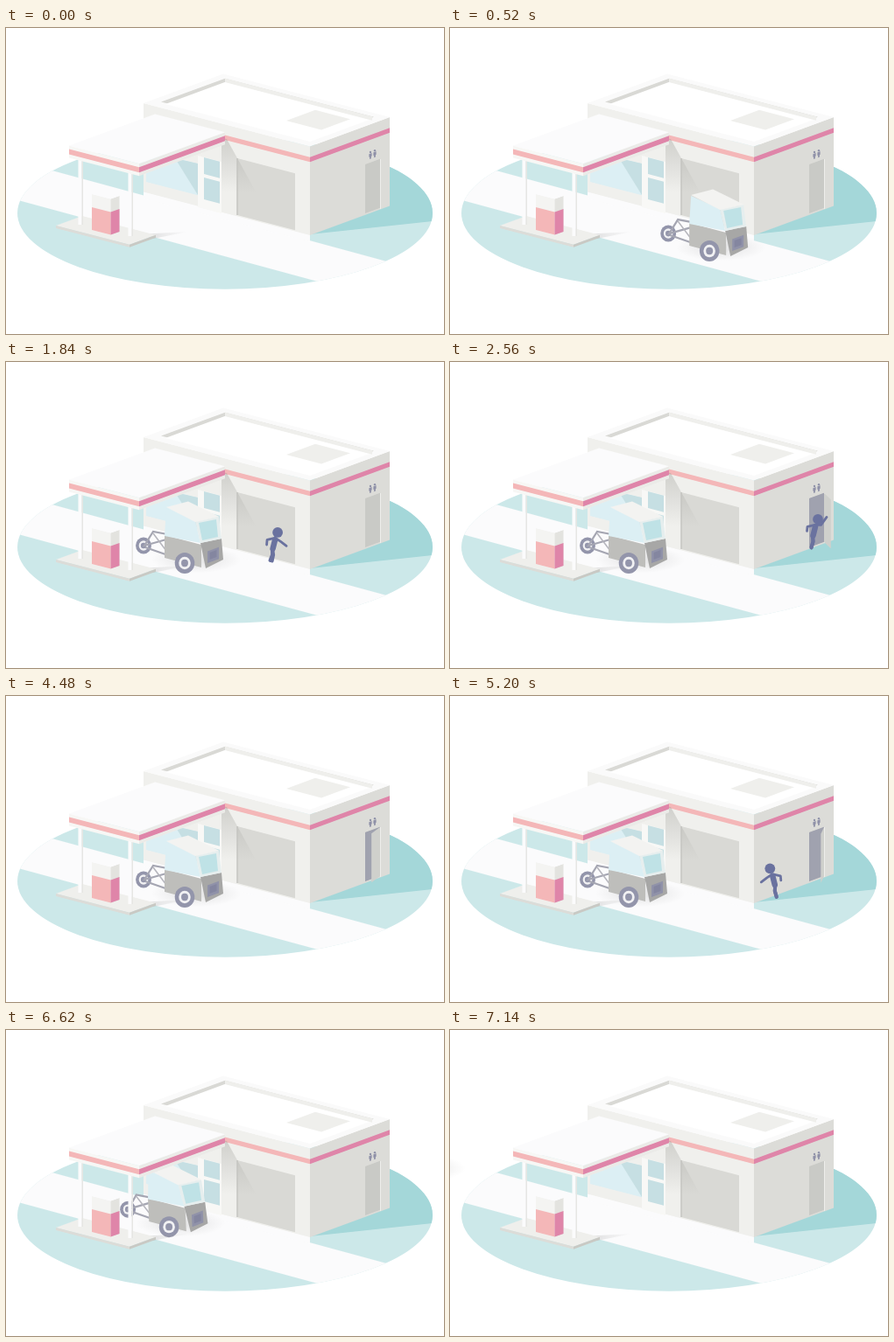
Write an HTML page with a canvas that moves like this. It is 500 by 350 pixels and loops after 8680 ms.

```html
<!DOCTYPE html>
<html>
<head>
<meta charset="utf-8">
<title>Fuel stop</title>
<style>
html, body { margin: 0; width: 100%; height: 100%; overflow: hidden; background: #fff; }
canvas { display: block; width: 500px; height: 350px; }
</style>
</head>
<body>
<canvas id="stage" width="500" height="350"></canvas>
<script>
const ctx = document.getElementById('stage').getContext('2d');
const LOOP = 8680, STEP = 40, LEAVE = 6620, GONE = 7140;

// Slopes of the two ground axes and of the road
const FRONT = 0.26, SIDE = -0.368, ROAD = 0.272;

const C = {
  salmon: '#f4b7b8', rose: '#df85a9', white: '#fbfbfc', pale: '#efefec',
  wall: '#dcdcd8', panel: '#d9d9d5', teal: '#a4d7d9', aqua: '#cce8e9',
  glass: '#dceff4', pane: '#c6dfe3', person: '#6a729f', tyre: '#9395ab'
};

function trace(p) {
  ctx.beginPath();
  for (let i = 0; i < p.length; i += 2) ctx.lineTo(p[i], p[i + 1]);
}

function poly(fill, ...p) {
  trace(p);
  ctx.fillStyle = fill;
  ctx.fill();
}

function line(color, width, ...p) {
  trace(p);
  ctx.strokeStyle = color;
  ctx.lineWidth = width;
  ctx.stroke();
}

function oval(fill, x, y, rx, ry = rx) {
  ctx.beginPath();
  ctx.ellipse(x, y, rx, ry, 0, 0, Math.PI * 2);
  ctx.fillStyle = fill;
  ctx.fill();
}

function fade(x0, y0, x1, y1, from, to) {
  const g = ctx.createLinearGradient(x0, y0, x1, y1);
  g.addColorStop(0, from);
  g.addColorStop(1, to);
  return g;
}

// Upright panel whose top edge starts at x, y and follows a slope
function upright(fill, slope, x, y, w, h) {
  const end = y + w * slope;
  poly(fill, x, y, x + w, end, x + w, end + h, x, y + h);
}
const front = (fill, ...at) => upright(fill, FRONT, ...at);
const side = (fill, ...at) => upright(fill, SIDE, ...at);

// Level surface from its left corner: a along the front, b along the side
function level(fill, x, y, a, b) {
  poly(fill, x, y, x + a, y + a * FRONT,
    x + a + b, y + a * FRONT + b * SIDE, x + b, y + b * SIDE);
}

// Paint a front face and the side face that joins it
function wrap(frontFill, sideFill, x, y, a, b, h) {
  front(frontFill, x, y, a, h);
  side(sideFill, x + a, y + a * FRONT, b, h);
}

const clamp = v => Math.max(0, Math.min(1, v));
const ramp = (t, from, to) => clamp((t - from) / (to - from));
const smooth = v => v * v * (3 - 2 * v);

function ground() {
  ctx.save();
  ctx.beginPath();
  ctx.ellipse(250, 211.7, 237, 87, 0, 0, Math.PI * 2);
  ctx.clip();
  ctx.fillStyle = C.aqua;
  ctx.fillRect(0, 100, 500, 220);
  poly(C.teal, 347, 100, 500, 100, 500, 219.5, 347, 236);
  upright(C.white, ROAD, 0, 148.7, 500, 44.5);
  front(C.white, 157, 183, 190, 12);
  ctx.restore();
}

function building() {
  const x = 157, y = 86, a = 190, b = 91;
  wrap('#f0f0ed', C.wall, x, y, a, b, 101.5);
  wrap(C.salmon, C.rose, 250, 122.6, 97, b, 5.5);

  // roof with a sunken floor
  level('#fafafa', x, y, a, b);
  level(C.panel, 177, 84.5, 170, 73);
  level('#fff', 182, 87, 165, 69);
  upright(C.pale, FRONT, 250, 57.5, 168, 4.5);
  level('#efefec', 320, 106, 40, 33);

  // shop front
  front(C.glass, 160, 140, 59, 36);
  poly(C.pane, 193, 149, 219, 155, 219, 191);
  front('#f8f8f6', 219, 146, 27, 59);
  for (const [top, h] of [[148, 19], [171, 25]]) front(C.pane, 226, top, 18, h);

  // garage and the canopy's shadow
  front(C.panel, 264, 149, 66, 65);
  poly(fade(0, 130, 0, 188, 'rgba(140,140,135,.3)', 'rgba(140,140,135,0)'),
    246, 126, 252, 127, 285, 187, 264, 210, 246, 205);
  line('#c5c5c1', 1.5, 264, 149, 264, 214);

  // side door and sign
  side('#c9cac6', 410, 156, 17, 56);
  line('#eeeeeb', 1, 427.5, 150, 427.5, 207);
  for (const px of [416, 421]) {
    const py = 142 + (px - 416) * SIDE;
    oval('#8f91a8', px, py, 1.2);
    side('#8f91a8', px - 1.6, py + 2.2, 3.2, 3.6);
    side('#8f91a8', px - 0.9, py + 4, 1.8, 4);
  }
}

function sideDoor(t) {
  const going = Math.min(ramp(t, 2300, 2680), ramp(t, 3280, 2900));
  const leaving = Math.min(ramp(t, 4440, 4620), ramp(t, 5440, 4820));
  const swing = Math.max(going, leaving);
  if (!swing) return;
  const angle = swing * Math.PI / 2;
  const x = 427 - 17 * Math.cos(angle) + 18 * Math.sin(angle);
  const y = 150 + 6 * Math.cos(angle) + 5 * Math.sin(angle);
  side('#a0a2af', 410, 156, 17, 56);
  upright('#cfd0cc', (y - 150) / (x - 427), 427, 150, x - 427, 56);
}

function person(x, y, dir, phase) {
  const k = Math.sin(phase), stride = Math.cos(phase);
  ctx.save();
  ctx.translate(x, y);
  ctx.scale(dir, 1);
  ctx.lineCap = ctx.lineJoin = 'round';
  for (const s of [stride, -stride]) {
    line(C.person, 4, 1.5, -16, 2 + s * 3, -9, s * 6, -2 - Math.max(0, -s) * 3);
  }
  line(C.person, 6.5, 4.5, -26, 2, -16);
  line(C.person, 2.8, 5, -28, 11, -26 + k * 2, 17.5, -28 + k * 9);
  line(C.person, 2.8, 4, -28, -4.5, -26, -5, -21 + stride * 3);
  oval(C.person, 7.5, -34.5, 5.9);
  ctx.restore();
}

// Vehicle, corner of the building, doorstep, inside
const route = [[232, 213], [352, 241], [418, 212], [402, 204]];
const wayBack = [...route].reverse();

function walk(t, path, times, dir, phase) {
  if (t < times[0] || t >= times[3]) return;
  const i = times.findIndex(end => t < end) - 1;
  const u = ramp(t, times[i], times[i + 1]);
  const [x, y] = path[i].map((v, k) => v + (path[i + 1][k] - v) * u);
  ctx.save();
  if (path[i] === route[3] || path[i + 1] === route[3]) {
    trace([410, 156, 427, 150, 427, 206, 410, 212]);
    ctx.clip();
  }
  person(x, y, dir, phase);
  ctx.restore();
}

function walker(t) {
  walk(t, route, [1440, 2120, 2600, 2820], 1, (t - 2560) / 75 - Math.PI / 2);
  walk(t, wayBack, [4480, 4700, 5430, 6120], -1, (t - 5200) / 75 + Math.PI / 2);
}

function wheel(x, y, r) {
  for (const [fill, size] of [[C.tyre, 1], ['#f1f1f3', 0.6], [C.tyre, 0.35]]) {
    oval(fill, x, y, r * 0.94 * size, r * size);
  }
}

function vehicle(dx, lean) {
  ctx.save();
  ctx.translate(dx, dx * ROAD);

  // soft ground shadow
  ctx.save();
  ctx.translate(217, 226);
  ctx.scale(1, 0.3);
  const g = ctx.createRadialGradient(0, 0, 12, 0, 0, 51);
  g.addColorStop(0, 'rgba(120,120,120,.15)');
  g.addColorStop(1, 'rgba(120,120,120,0)');
  oval(g, 0, 0, 51);
  ctx.restore();

  wheel(157, 210, 9.5);
  ctx.save();
  ctx.transform(1, 0, lean * 0.05, 1 + lean * 0.02, -lean * 11, -lean * 4.5);

  // front frame
  line('#a5a6b2', 2.2, 184, 197, 168, 194, 158, 210, 183, 203);
  line('#a5a6b2', 2.2, 159, 212, 182, 220);
  line('#b5b5bc', 1.5, 168, 196, 183, 216);

  // body
  front('#bebebb', 181, 198, 42, 26);
  poly('#a7a7a6', 222, 207, 246, 202, 248, 226, 228, 236);
  side('#9092a9', 230, 216.5, 13, 13.5);
  side('#8486a0', 232.5, 218, 8, 8);

  // cabin
  poly(C.glass, 183, 167, 216, 182, 222, 207, 181, 199);
  poly('#e6eeee', 216, 182, 243, 177, 246, 202, 222, 207);
  poly('#bfe2e6', 220, 184, 240, 180, 242, 200, 224, 204);
  poly('#f3f3f1', 183, 166, 208, 159.5, 243.5, 177, 216, 183);
  ctx.restore();

  wheel(204, 230, 12);
  ctx.restore();
}

function drive(t) {
  if (t < 1100) {
    vehicle(380 * (1 - ramp(t, 0, 1080)) ** 2 - 10, smooth(ramp(t, 760, 1060)));
  } else if (t < LEAVE) {
    const lean = 1 - smooth(ramp(t, 1100, 1240));
    vehicle(-10 * lean, lean);
  } else {
    vehicle(-250 * ((t - 6430) / 710) ** 2, 1);
  }
}

function pillar(x, top, bottom) {
  ctx.fillStyle = C.white;
  ctx.fillRect(x, top, 4, bottom - top);
  ctx.fillStyle = '#e6e6e3';
  ctx.fillRect(x + 4, top, 1.5, bottom - top);
}

function forecourt() {
  // island
  poly(fade(165, 0, 208, 0, 'rgba(150,150,150,.25)', 'rgba(150,150,150,0)'),
    150, 236, 208, 233, 168, 241);
  level(C.pale, 57, 226, 84, 30);
  wrap(C.wall, '#c9c9c4', 57, 226, 84, 30, 3);

  // pump
  wrap('#f4f4f2', '#e3e3df', 98, 190, 21.5, 10, 41);
  wrap(C.salmon, C.rose, 98, 205, 21.5, 10, 26);
  level(C.white, 98, 190, 21.5, 10);

  pillar(82.5, 150, 225);
  pillar(139.5, 163, 238);

  // canopy
  wrap('#f7f7f5', '#ebebe8', 72, 134.5, 80, 98, 14);
  wrap(C.salmon, C.rose, 72, 138.5, 80, 98, 6);
  level(C.white, 72, 134.5, 80, 98);
}

function draw(now) {
  const raw = now % LOOP;
  const base = raw < LEAVE ? 0 : LEAVE;
  const t = Math.min(GONE, base + Math.floor((raw - base) / STEP) * STEP);
  ctx.fillStyle = '#fff';
  ctx.fillRect(0, 0, 500, 350);
  ground();
  building();
  sideDoor(t);
  walker(t);
  drive(t);
  forecourt();
}

const start = performance.now();
function tick() {
  draw(performance.now() - start);
  requestAnimationFrame(tick);
}
tick();
</script>
</body>
</html>
```
